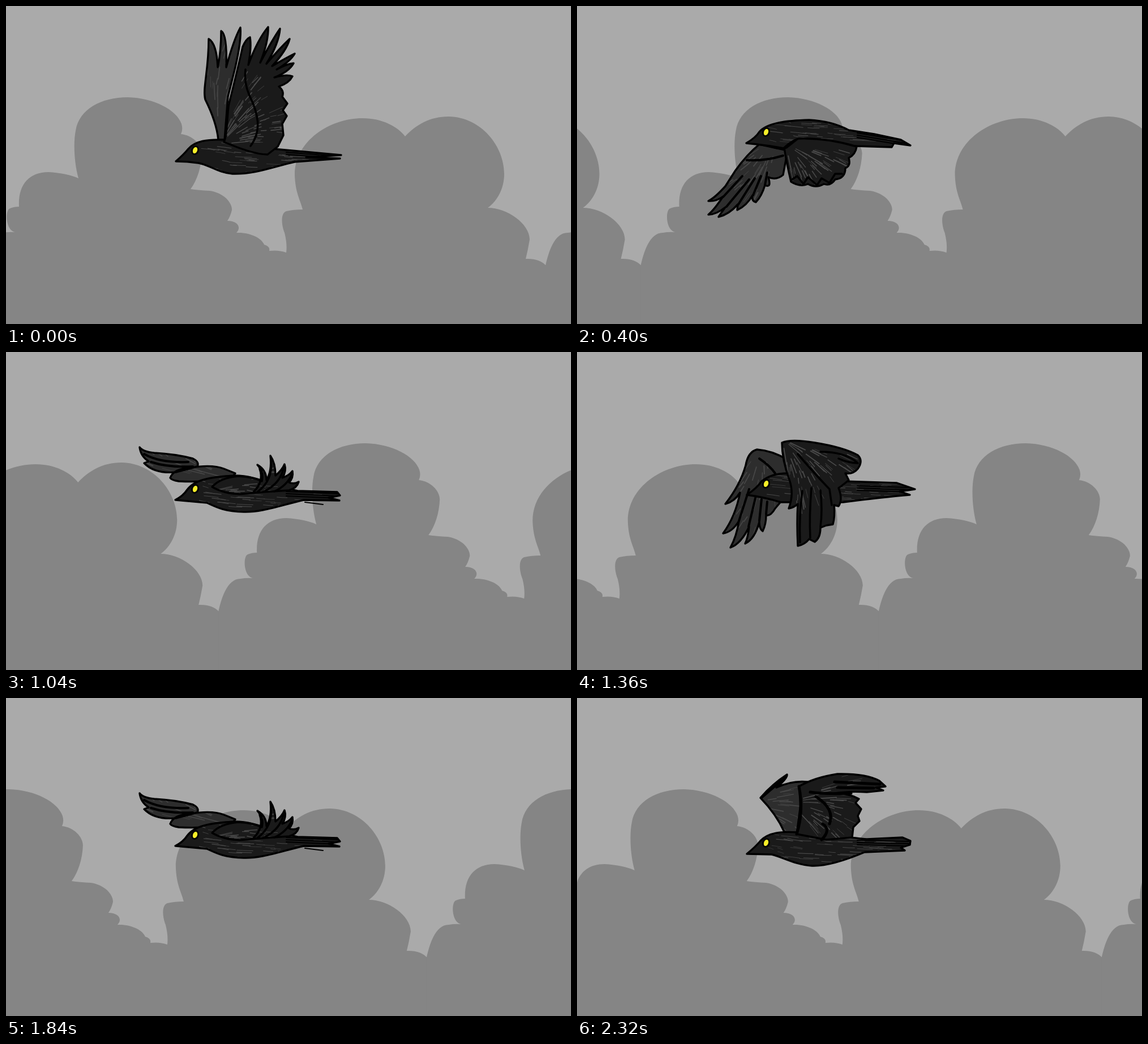
An HTML page with a canvas that plays this animation: 998 by 561 pixels, repeating every 2.4 s.

```html
<!DOCTYPE html>
<html lang="en">
<head>
<meta charset="utf-8">
<title>Crow in flight</title>
<style>
html, body { margin: 0; width: 100%; height: 100%; overflow: hidden; background: #aaa; }
canvas { display: block; width: 100vw; height: 100vh; }
</style>
</head>
<body>
<canvas id="stage" width="998" height="561"></canvas>
<script>
const W = 998, H = 561, LOOP = 2400;
const ctx = document.getElementById('stage').getContext('2d');

const cloud = new Path2D(
  'M-45 600V458C-40 436 -30 400 -6 400Q5 398 16 399C-1 396 -2 360 7 357Q14 354 23 354' +
  'C21 316 40 293 75 293Q108 295 128 304C120 275 119 240 123 220C129 182 168 161 215 161' +
  'C262 162 302 184 310 208Q313 218 309 226C330 228 346 245 346 260C345 284 338 307 326 323' +
  'Q340 325 360 326C386 330 400 348 399 360Q396 372 391 379C410 379 416 391 407 400' +
  'C432 399 452 410 456 421Q467 424 465 432Q482 430 495 435Q497 420 492 400' +
  'C487 388 484 366 495 362Q508 359 524 359C520 342 511 330 510 298C510 238 572 198 630 198' +
  'C665 198 692 213 705 230C724 210 748 195 782 195C840 196 880 248 880 296' +
  'C880 322 868 344 851 356C885 356 925 384 925 412Q922 430 918 446Q942 445 954 458V600Z');

// fans: [x, y, from angle, to angle, from radius, to radius, count]
const drawings = {
  up: {
    beak: 274, tail: [258, 265],
    body: 'M300 274Q314 262 322 252C334 238 356 235 383 236C420 240 450 250 472 252L592 263L530 267L590 269L510 275C470 284 440 297 400 296C375 294 358 280 340 277Q320 274 300 274Z',
    far: 'M375 236Q372 205 352 165C347 145 358 115 358 58Q372 66 374 108Q380 80 380 44Q391 50 389 108Q402 60 414 38Q416 60 405 108L392 160L386 236Z',
    farFan: [382, 240, -105, -80, 40, 170, 22],
    near: 'M385 240C392 225 390 190 394 172C402 140 412 100 418 72Q424 58 431 55Q434 72 428 104Q444 60 463 37Q464 62 449 100Q470 60 484 40Q482 66 460 102Q484 74 501 58Q496 78 470 106Q494 92 510 84Q502 98 478 112Q496 102 508 101Q500 116 474 126Q496 120 506 124Q500 136 482 142Q492 150 488 160L497 172L489 184L496 194L488 208L490 228L480 248L462 262C440 262 410 250 385 240Z',
    nearFan: [378, 245, -72, -5, 20, 125, 75],
    ink: 'M423 112Q420 135 430 158C446 190 452 220 432 247'
  },
  flat: {
    beak: 261, tail: [250, 254],
    body: 'M299 261Q313 254 320 243C332 226 360 220 405 218C440 218 470 235 515 245L585 247L590 253L570 257L589 262L526 261C480 272 450 283 420 282C385 281 372 274 355 266Z',
    far: 'M236 168Q242 176 262 178Q300 180 330 188Q342 194 338 202L300 212Q262 215 244 196L252 193Q238 184 236 168ZM290 222Q296 206 325 204Q365 198 385 206L405 214Q400 224 370 226Q340 230 305 228Q292 226 290 222Z',
    farFan: [410, 224, 184, 204, 20, 165, 24],
    farInk: 'M244 180Q272 196 322 194M256 194Q286 204 330 202',
    near: 'M364 238Q378 222 410 219Q436 220 452 228Q456 212 444 199Q460 208 460 226Q470 210 467 183Q476 196 476 218Q488 208 492 198Q496 210 488 222Q500 218 506 210Q508 222 500 230Q508 234 517 229Q514 240 500 244L440 248Q395 256 364 238Z',
    nearFan: [350, 250, -22, 0, 25, 120, 22],
    ink: 'M448 206Q456 228 438 246M468 192Q472 226 444 247M490 206Q484 232 456 246M505 216Q496 236 474 246'
  },
  down: {
    beak: 242, tail: [228, 243],
    body: 'M299 242Q316 232 322 222C336 206 370 202 410 201Q450 203 480 219L525 226L572 236L589 246L560 242L556 249L490 247L440 250L370 252Q340 246 299 242Z',
    far: 'M322 244Q300 262 280 290L262 318Q244 338 232 344Q246 345 258 336Q242 360 232 368Q246 368 262 355Q254 366 250 372Q268 368 284 350L283 360Q300 352 310 334Q308 344 316 346Q326 336 332 316Q344 322 338 302Q352 308 364 298L372 255Z',
    farFan: [350, 230, 95, 145, 35, 110, 35],
    farInk: 'M300 272Q330 274 364 264M292 300L258 337M304 306L264 354M314 304L285 350M325 300L311 334M336 294L332 316',
    near: 'M366 250Q376 240 390 234Q440 232 494 248Q492 262 480 268Q484 282 474 286Q474 304 456 306Q448 318 436 314Q422 322 408 314Q394 320 378 310Q370 276 366 250Z',
    nearFan: [368, 244, 5, 80, 20, 100, 50],
    ink: 'M340 247Q360 254 370 250L389 235M380 306L389 300L400 314L408 302L424 316L432 304L446 312L456 296L468 296'
  },
  lift: {
    beak: 252, tail: [240, 243],
    body: 'M300 252Q318 240 326 228Q345 213 375 214L470 228L565 231L597 242L570 246L588 252Q540 256 470 265L360 265Q330 256 300 252Z',
    far: 'M372 190Q345 174 318 172Q302 176 298 200Q288 235 262 268Q278 264 288 248Q280 290 258 320Q274 318 286 298Q282 325 271 345Q290 338 304 308Q302 328 297 338Q314 330 322 300Q322 312 328 316Q334 304 334 288Q342 290 350 276L372 250Z',
    farFan: [325, 165, 70, 125, 30, 145, 35],
    farInk: 'M322 188Q340 200 350 214M304 242L286 298M316 254L303 308M326 260L322 298M336 264L334 286',
    near: 'M374 276Q384 250 375 225Q362 190 362 160Q378 153 420 160Q470 168 496 182Q506 192 496 206Q488 216 474 214L480 226Q468 236 462 240Q470 260 462 272L454 270Q456 290 452 304L440 306L430 310Q430 328 420 335L410 330Q402 340 390 342Q388 300 390 268Q384 274 374 276Z',
    nearFan: [362, 154, 12, 82, 15, 125, 55],
    ink: 'M398 245Q392 290 394 336M414 240Q410 290 412 328M430 244Q434 280 430 308M446 242L450 270M390 180Q420 215 446 242M430 176Q474 176 496 196Q480 196 462 188'
  },
  fold: {
    beak: 267, tail: [250, 254],
    body: 'M298 267Q314 258 322 246C334 232 360 229 388 231C430 236 470 242 515 244L588 245L595 254L572 258L580 264L518 266C480 274 450 290 415 289C380 286 360 272 338 268Z',
    far: 'M388 231C388 200 380 170 365 160Q340 146 320 143Q304 144 301 160Q300 195 283 228Q292 225 297 216Q290 250 281 273Q292 268 300 258L320 248Q335 232 352 230Z',
    farFan: [312, 140, 25, 95, 15, 110, 30],
    farInk: 'M308 190L297 216M320 186Q310 220 300 256M328 186Q326 222 314 246M332 184Q344 206 348 228',
    near: 'M386 234Q396 210 391 192Q364 165 366 148Q374 130 402 129Q440 132 460 162L487 185Q486 194 480 198Q496 206 490 218Q498 232 488 242L468 248Q420 246 386 234Z',
    nearFan: [376, 130, 25, 80, 15, 140, 42],
    ink: 'M390 160Q400 186 411 208M402 166Q410 200 436 236M414 160Q430 196 453 224M425 154Q450 182 470 206M440 146Q460 176 485 188',
    inkWidth: 5.5
  },
  rise: {
    beak: 275, tail: [255, 257],
    body: 'M300 275Q316 262 324 252C338 237 362 235 390 237C430 240 470 245 512 249L575 246L589 252L588 259L572 264L579 269L508 272C470 288 440 297 415 296C385 294 362 280 344 276Z',
    far: 'M366 236Q352 205 324 176Q345 152 371 135Q372 142 352 158Q380 145 408 148L396 180L388 240Z',
    farFan: [300, 190, -28, 32, 35, 110, 34],
    farInk: 'M326 176L368 140',
    near: 'M388 240Q398 205 392 156Q420 140 460 134Q510 133 534 146L545 156L528 158L541 163L512 166Q480 164 455 168Q480 168 498 178L492 185L502 196L496 208L499 217L488 228L486 246L440 250Z',
    nearFan: [375, 185, -30, 48, 25, 120, 55],
    ink: 'M392 156Q401 200 388 240M422 174Q456 196 446 222M434 222Q450 232 432 250M412 166Q440 170 484 168M455 148L535 152M460 158L524 159',
    inkWidth: 5
  }
};

// drawing, vertical shift, wing turn, wing scale x, wing scale y
const poses = [
  ['up', 0, 0, 1, 1],
  ['up', -3, -.12, 1.05, 1.05],
  ['up', -8, -.25, 1.02, 1.02],
  ['flat', 0, 0, 1, 1],
  ['down', 9, .04, 1.1, .6],
  ['down', 0, 0, 1, 1],
  ['lift', -6, 0, 1, .94],
  ['lift', 0, 0, 1, 1],
  ['fold', 0, 0, 1, 1],
  ['rise', 0, 0, 1, 1]
];

for (const d of Object.values(drawings))
  for (const k of ['body', 'far', 'near', 'ink', 'farInk']) d[k] = new Path2D(d[k] || '');

function random(seed) {
  return () => {
    seed = (seed * 1664525 + 1013904223) >>> 0;
    return seed / 4294967296;
  };
}

function line(path, width, color = '#000') {
  ctx.lineWidth = width;
  ctx.strokeStyle = color;
  ctx.stroke(path);
}

// Fill, brush marks inside, then a dark contour
function shape(path, fill, marks) {
  ctx.fillStyle = fill;
  ctx.fill(path);
  ctx.save();
  ctx.clip(path);
  marks();
  ctx.restore();
  line(path, 3.4);
}

function fan([x, y, a0, a1, r0, r1, count], color, seed) {
  const rnd = random(seed);
  for (let i = 0; i < count; i++) {
    const a = (a0 + (a1 - a0) * rnd()) * Math.PI / 180;
    const r = r0 + (r1 - r0) * rnd(), e = r + 8 + 22 * rnd();
    const p = new Path2D();
    p.moveTo(x + r * Math.cos(a), y + r * Math.sin(a));
    p.lineTo(x + e * Math.cos(a + .03), y + e * Math.sin(a + .03));
    line(p, .7 + 1.3 * rnd(), color);
  }
}

function grain(d) {
  const rnd = random(d.beak);
  for (let i = 0; i < 85; i++) {
    const x = 335 + 220 * rnd(), y = d.beak - 42 + 64 * rnd(), len = 8 + 24 * rnd();
    const p = new Path2D();
    p.moveTo(x, y);
    p.quadraticCurveTo(x + len / 2, y + 1, x + len, y + (x < 390 ? 3 : 1));
    line(p, .6 + .7 * rnd(), '#484848');
  }
  const [y0, y1] = d.tail;
  for (const k of [-1, 0, 1]) {
    const p = new Path2D();
    p.moveTo(495, y0 + k * 4);
    p.lineTo(586, y1 + k * 4);
    line(p, 2);
  }
}

function oval(x, y, rx, ry, color) {
  ctx.fillStyle = color;
  ctx.beginPath();
  ctx.ellipse(x, y, rx, ry, .35, 0, Math.PI * 2);
  ctx.fill();
}

function wing(turn, sx, sy, paint) {
  ctx.save();
  ctx.translate(400, 245);
  ctx.rotate(turn);
  ctx.scale(sx, sy);
  ctx.translate(-400, -245);
  paint();
  ctx.restore();
}

function drawBird([name, dy, ...move]) {
  const d = drawings[name];
  ctx.save();
  ctx.translate(0, dy);
  ctx.lineCap = ctx.lineJoin = 'round';
  wing(...move, () => {
    shape(d.far, '#2d2d2d', () => fan(d.farFan, '#474747', 7));
    line(d.farInk, 4);
  });
  shape(d.body, '#1a1a1a', () => grain(d));
  if (name === 'flat') line(new Path2D('M528 265L560 269'), 2);
  wing(...move, () => {
    shape(d.near, '#1a1a1a', () => fan(d.nearFan, '#4a4a4a', 19));
    line(d.ink, d.inkWidth || 3.5);
  });
  oval(334, d.beak - 19.5, 7, 8.5, '#050505');
  oval(334, d.beak - 19.5, 3.9, 5.8, '#f8ef28');
  ctx.restore();
}

// Four scroll ticks in every 240 ms, resting at both ends of the loop
function scrollAt(t) {
  const r = t % 240;
  const tick = 4 * Math.floor(t / 240) + (r >= 80) + (r >= 120) + (r >= 160);
  return Math.min(37, Math.max(0, tick - 1)) * W / 38;
}

function draw(t) {
  ctx.fillStyle = '#aaa';
  ctx.fillRect(0, 0, W, H);
  ctx.fillStyle = '#858585';
  ctx.fillRect(0, 459, W, H - 459);
  const x = scrollAt(t);
  for (const shift of [x - W, x, x + W]) {
    ctx.save();
    ctx.translate(shift, 0);
    ctx.fill(cloud);
    ctx.restore();
  }
  drawBird(poses[Math.floor(t / 80) % poses.length]);
}

const start = performance.now();
function play(now) {
  draw(Math.max(0, now - start) % LOOP);
  requestAnimationFrame(play);
}
draw(0);
requestAnimationFrame(play);
</script>
</body>
</html>
```
